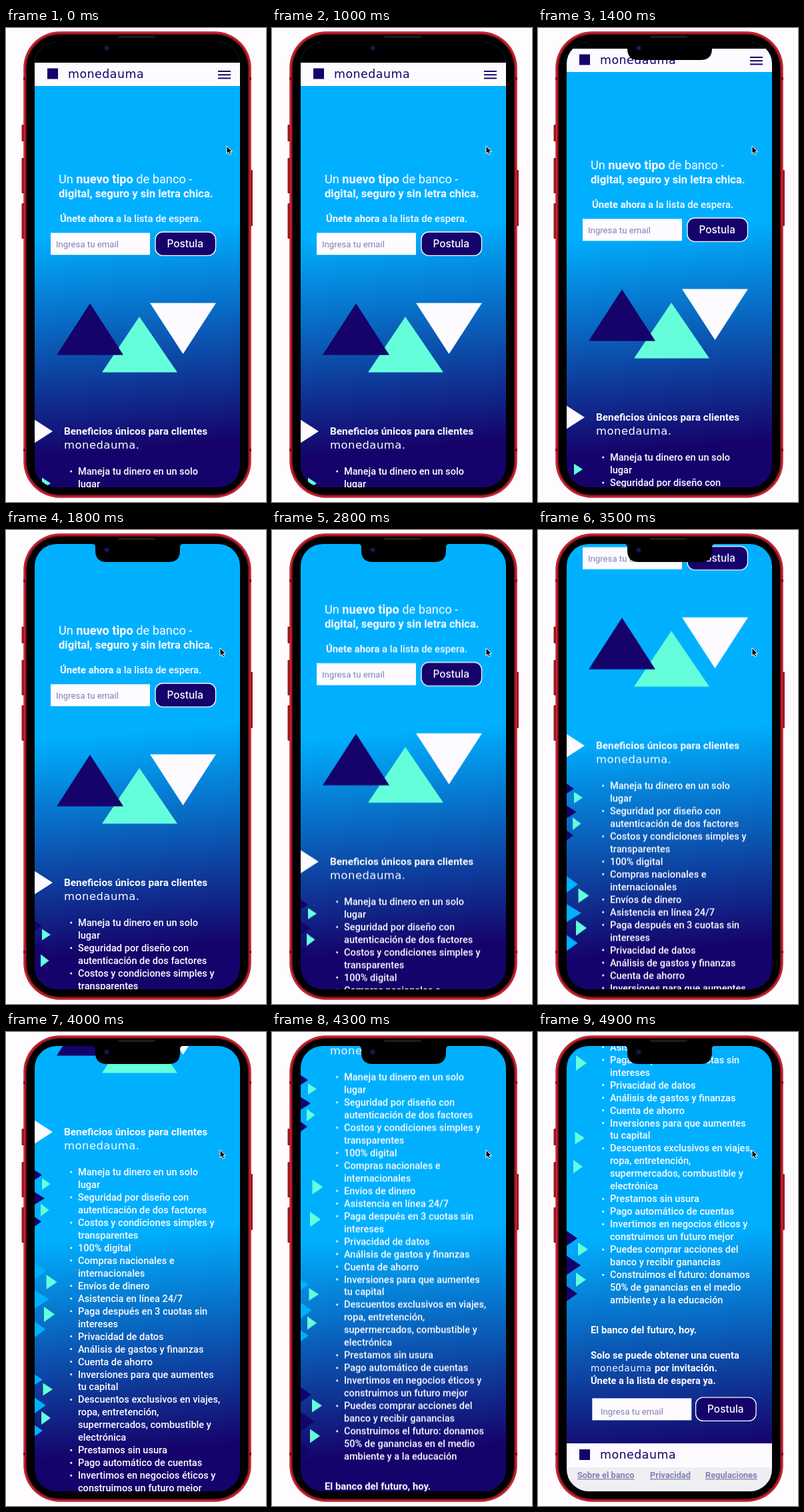
Animation, 390 px wide and 711 px high, one loop 5 s. Source, as an HTML page:

```html
<!DOCTYPE html>
<html lang="es">
<head>
<meta charset="utf-8">
<title>monedauma</title>
<style>
  html, body { margin: 0; width: 100%; height: 100%; overflow: hidden; background: #fefcff; }
  svg { display: block; width: 390px; height: 711px; }
  text { font-family: Roboto, "Noto Sans", sans-serif; fill: #fdfbff; }
  .brand { font-family: "DejaVu Sans", sans-serif; }
  .btn { font-family: Inter, sans-serif; }
</style>
</head>
<body>
<svg viewBox="0 0 390 711">
  <defs>
    <linearGradient id="sky" gradientUnits="userSpaceOnUse" x1="197" y1="300" x2="225" y2="628">
      <stop offset="0" stop-color="#00b0ff"/>
      <stop offset="1" stop-color="#15036b"/>
    </linearGradient>
    <clipPath id="screen"><rect x="43" y="21" width="308" height="668" rx="33"/></clipPath>
  </defs>

  <g id="body">
    <g fill="#9c1520">
      <rect x="23.5" y="145" width="4" height="25" rx="1"/>
      <rect x="23.5" y="195" width="4" height="53" rx="1"/>
      <rect x="23.5" y="263" width="4" height="53" rx="1"/>
      <rect x="366.5" y="213" width="3.5" height="84" rx="1"/>
    </g>
    <rect x="26.3" y="5.3" width="341.4" height="699.4" rx="54.7" fill="#a51823"/>
    <rect x="27.3" y="6.3" width="339.4" height="697.4" rx="53.7" fill="#e02c38"/>
    <rect x="28.8" y="7.8" width="336.4" height="694.4" rx="52.2" fill="#6a0d15"/>
    <rect x="29.8" y="8.8" width="334.4" height="692.4" rx="51.2" fill="#a81823"/>
    <rect x="30.7" y="9.7" width="332.6" height="690.6" rx="50.3"/>
    <path d="M26 76h4M364 76h4M26 633h4M364 633h4" stroke="#7d1019" stroke-width="4"/>
  </g>

  <g clip-path="url(#screen)">
    <rect x="42" y="20" width="310" height="670" fill="url(#sky)"/>
    <g id="page"></g>
  </g>

  <path d="M129 20.5Q134 21 134 26V31Q134 48 151 48H244Q261 48 261 31V26Q261 21 266 20.5Z"/>
  <rect x="168" y="11.5" width="56" height="3.5" rx="1.7" fill="#1b1b20"/>
  <circle cx="151" cy="30" r="4.5" fill="#0b0d2a"/>
  <circle cx="151" cy="30" r="1.8" fill="#1d2a80"/>

  <g id="cursor">
    <path d="M0 0V11.6L2.7 9.2L4.6 13.2L6.7 12.2L4.9 8.4H8.4Z" stroke="#fff" stroke-width="1"/>
  </g>
</svg>
<script>
const NAVY = '#15036b', MINT = '#64ffda', BLUE = '#00b0ff', PAPER = '#fdfbff', SLATE = '#7f80b6';
const NAME = 'monedauma';
const END = 832; // furthest scroll

const text = (x, y, size, weight, str, fill = PAPER) =>
  `<text x="${x}" y="${y}" font-size="${size}" font-weight="${weight}" style="fill:${fill}">${str}</text>`;
const bold = str => `<tspan font-weight="700">${str}</tspan>`;
const rect = (x, y, w, h, fill, more = '') =>
  `<rect x="${x}" y="${y}" width="${w}" height="${h}" fill="${fill}" ${more}/>`;
const tri = (points, fill) => `<polygon points="${points}" fill="${fill}"/>`;
const brand = (x, y, size, fill, tail = '') =>
  `<text class="brand" x="${x}" y="${y}" font-size="${size}" letter-spacing="0.5" style="fill:${fill}">${NAME}${tail}</text>`;
const logo = y => rect(62, y - 14, 16, 16, NAVY) + brand(93, y, 17.4, NAVY);

// Right-pointing arrow: left edge, tip, middle, half height
const arrow = ([x, tip, y, h, fill]) => tri(`${x},${y - h} ${tip},${y} ${x},${y + h}`, fill);

const form = (x, y, gap, pad, drop) =>
  rect(x, y, 149, 33, PAPER) +
  text(x + pad, y + drop, 13.2, 400, 'Ingresa tu email', SLATE) +
  rect(x + gap, y - 1.3, 90.5, 35.3, NAVY, `rx="11" stroke="${PAPER}" stroke-width="1.3"`) +
  `<text class="btn" x="${x + gap + 17.5}" y="${y + 21.7}" font-size="15.4" font-weight="500">Postula</text>`;

// A leading * starts a new bullet
const lines = `*Maneja tu dinero en un solo|lugar|*Seguridad por diseño con|autenticación de dos factores
|*Costos y condiciones simples y|transparentes|*100% digital|*Compras nacionales e|internacionales
|*Envíos de dinero|*Asistencia en línea 24/7|*Paga después en 3 cuotas sin|intereses|*Privacidad de datos
|*Análisis de gastos y finanzas|*Cuenta de ahorro|*Inversiones para que aumentes|tu capital
|*Descuentos exclusivos en viajes,|ropa, entretención,|supermercados, combustible y|electrónica
|*Prestamos sin usura|*Pago automático de cuentas|*Invertimos en negocios éticos y|construimos un futuro mejor
|*Puedes comprar acciones del|banco y recibir ganancias|*Construimos el futuro: donamos
|50% de ganancias en el medio|ambiente y a la educación`.split('|').map(s => s.trim());

const list = lines.map((s, i) => {
  const y = 670 + i * 18.97;
  const dot = s[0] === '*' ? `<circle cx="97.7" cy="${y - 5}" r="1.5" fill="${PAPER}"/>` : '';
  return dot + text(108, y, 14.55, 500, s.replace('*', ''));
}).join('');

const arrows = [
  [42, 70, 605, 18, PAPER],
  [42, 54, 669.5, 8, NAVY], [54, 67, 683, 8.5, MINT], [42, 58, 704.5, 10, NAVY],
  [52, 64.5, 722, 9.5, MINT], [42, 53, 739.5, 8, NAVY],
  [42, 60, 813, 13, BLUE], [60.5, 76.5, 830, 11, MINT], [42, 65, 856, 14, BLUE],
  [57, 73, 878.5, 11.5, MINT], [42, 59.5, 901, 12.5, BLUE],
  [42, 55, 976.5, 8.5, BLUE], [55.5, 70, 991, 9.5, MINT], [42, 59.5, 1015, 12.5, BLUE],
  [53, 67, 1034, 10, MINT], [42, 55, 1053, 9, BLUE],
  [42, 59, 1141.5, 12, NAVY], [60, 75, 1158, 10, MINT], [42, 64, 1182, 15, NAVY],
  [57, 72, 1203.5, 10.5, MINT], [42, 59, 1224.5, 12, NAVY]
].map(arrow).join('');

const link = (x, str) =>
  `<text x="${x}" y="${END + 669}" font-size="12.8" font-weight="700" text-decoration="underline" style="fill:${SLATE}">${str}</text>`;

const head =
  rect(42, -300, 310, 352, '#000') + rect(42, 52, 310, 35, PAPER) + logo(74.5) +
  [64, 69.2, 74.4].map(y => rect(318, y, 19, 2, NAVY)).join('');

const hero =
  text(79, 233, 18.2, 400, `Un ${bold('nuevo tipo')} de banco -`) +
  text(79, 254, 16.6, 700, 'digital, seguro y sin letra chica.') +
  text(81, 290.5, 14.8, 500, `${bold('Únete ahora')} a la lista de espera.`) +
  form(67, 307.3, 157, 8, 21.7) +
  tri('200,433 144,516.5 257,516.5', MINT) +
  tri('126,413 76,490.5 176,490.5', NAVY) +
  tri('216,412.5 315,412.5 265.5,489', PAPER);

const benefits =
  text(87, 610, 15.35, 700, 'Beneficios únicos para clientes') +
  brand(87, 631, 16.4, PAPER, '.') + list;

const foot =
  text(79, END + 451.5, 14.8, 700, 'El banco del futuro, hoy.') +
  text(79, END + 490, 14.6, 700, 'Solo se puede obtener una cuenta') +
  brand(79, END + 509, 13.8, PAPER) +
  text(175, END + 509, 14.6, 700, 'por invitación.') +
  text(79, END + 528, 14.6, 700, 'Únete a la lista de espera ya.') +
  form(81.3, END + 549.4, 155.3, 12.7, 24.6) +
  rect(42, END + 617, 310, 36, PAPER) + rect(42, END + 653, 310, 60, '#efeef2') +
  logo(END + 640) +
  link(59, 'Sobre el banco') + link(168, 'Privacidad') + link(251, 'Regulaciones');

const page = document.getElementById('page');
page.innerHTML = arrows + hero + benefits + foot + head;

// [ms, value]
const scroll = [[0, 0], [1200, 0], [1300, 6], [1500, 36], [1800, 76], [2100, 95], [2400, 104], [2800, 107.5],
  [3000, 122], [3300, 208.5], [3600, 318], [4000, 455], [4400, 645], [4700, 795], [4900, END]];
const pointer = [[0, 331], [500, 321], [4900, 321]];

const LOOP = 5000, STEP = 100;
function at(keys, t) {
  const i = keys.findIndex(k => k[0] >= t);
  if (i < 1) return keys[i < 0 ? keys.length - 1 : 0][1];
  const [t0, a] = keys[i - 1], [t1, b] = keys[i];
  return a + (b - a) * (t - t0) / (t1 - t0);
}
function play(el, keys, pose) {
  const frames = [];
  for (let t = 0; t <= LOOP; t += STEP) {
    frames.push({ offset: t / LOOP, transform: pose(at(keys, t)), easing: 'step-end' });
  }
  el.animate(frames, { duration: LOOP, iterations: Infinity });
}
play(page, scroll, s => `translate(0px, ${-s}px)`);
play(document.getElementById('cursor'), pointer, x => `translate(${x}px, 177px)`);
</script>
</body>
</html>
```
